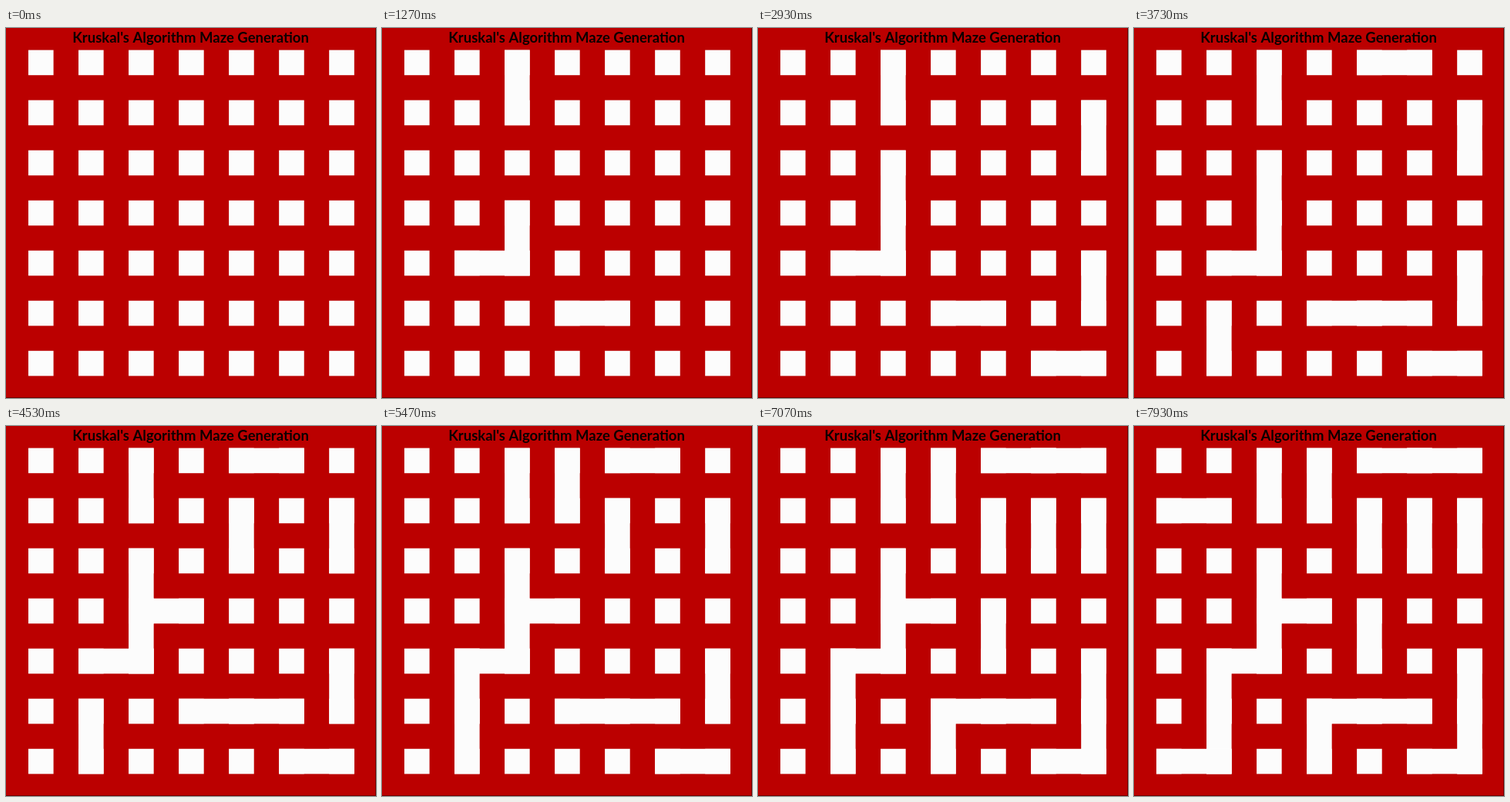
These frames come from a looping animation (480 px wide and 480 px high, 8000 ms). An HTML page with a canvas:

```html
<!DOCTYPE html>
<html lang="en">
<head>
<meta charset="utf-8">
<title>Maze Generation</title>
<style>
  html, body { margin: 0; width: 100%; height: 100%; overflow: hidden; background: #bb0000; }
  canvas { display: block; }
</style>
</head>
<body>
<canvas id="stage" width="480" height="480"></canvas>
<script>
const ctx = document.getElementById('stage').getContext('2d');
const LOOP = 8000, FIRST = 100, STEP = 360;
const COUNT = 7, PITCH = 65.03, SIZE = 32.6, LEFT = 29, TOP = 28.6;

// Opened passages in order: column, row, direction (h = right, v = down).
const passages = [
  '20v', '23v', '35h', '14h',
  '61v', '22v', '64v', '56h',
  '40h', '45h', '15v',
  '41v', '23h', '30v', '14v',
  '51v', '43v', '50h',
  '65v', '35v', '01h', '06h'
].map(([col, row, dir]) => ({ col: +col, row: +row, dir }));

function drawRoom(col, row, dir) {
  const w = SIZE + (dir === 'h' ? PITCH : 0);
  const h = SIZE + (dir === 'v' ? PITCH : 0);
  ctx.fillRect(LEFT + col * PITCH, TOP + row * PITCH, w, h);
}

function drawTitle() {
  ctx.fillStyle = '#0c0000';
  ctx.font = '700 18.5px Lato, sans-serif';
  ctx.textAlign = 'center';
  ctx.fillText("Kruskal's Algorithm Maze Generation", 239.5, 18.5);
}

function render(now) {
  const t = now % LOOP;
  const opened = Math.max(0, Math.floor((t - FIRST) / STEP) + 1);

  ctx.fillStyle = '#bb0000';
  ctx.fillRect(0, 0, 480, 480);
  ctx.fillStyle = '#700000';
  ctx.fillRect(479, 0, 1, 480);
  ctx.fillRect(0, 479, 480, 1);

  ctx.fillStyle = '#fcfcfc';
  for (let row = 0; row < COUNT; row++) {
    for (let col = 0; col < COUNT; col++) drawRoom(col, row);
  }
  for (const p of passages.slice(0, opened)) drawRoom(p.col, p.row, p.dir);
  drawTitle();
}

const start = performance.now();
function tick() {
  render(performance.now() - start);
  requestAnimationFrame(tick);
}
tick();
</script>
</body>
</html>
```
